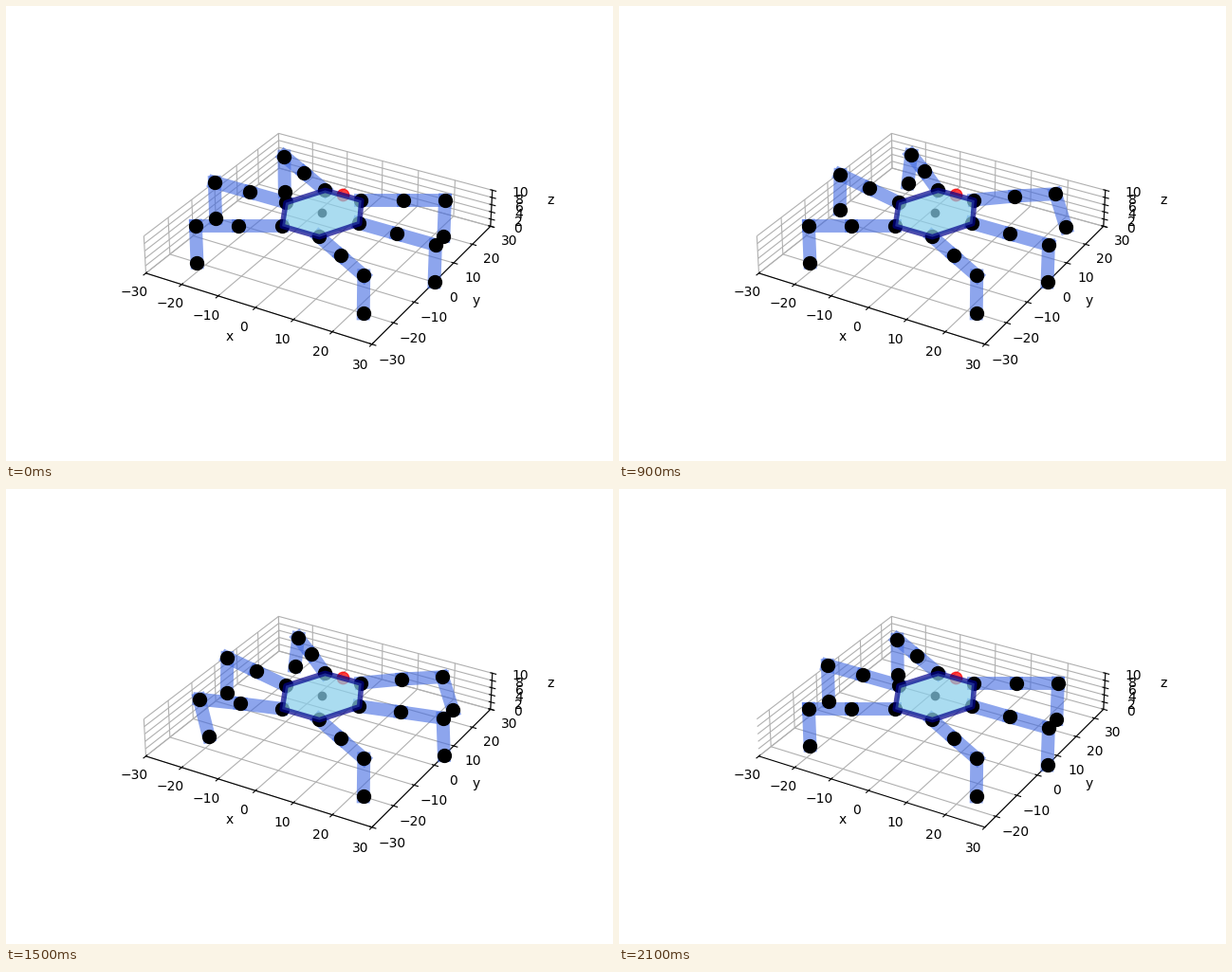
Recreate the animation shown at these times as a matplotlib script. Size 640 px wide and 480 px high, loop 2.25 s.

```python
import numpy as np
import matplotlib.pyplot as plt
from matplotlib.animation import FuncAnimation
from mpl_toolkits.mplot3d.art3d import Poly3DCollection

LINK = 10      # length of coxa, femur and tibia
HEIGHT = 10    # body height above ground
STRIDE = 5     # forward travel per gait cycle
LIFT = 5       # foot clearance while swinging
STEPS = 15

# Hip position (x, y) and resting yaw, in stepping order
LEGS = [(-5, 10, 150), (5, 10, 30), (-10, 0, 180),
        (10, 0, 0), (-5, -10, 210), (5, -10, -30)]
OUTLINE = [(-10, 0), (-5, 10), (5, 10), (10, 0), (5, -10), (-5, -10)]


def solve_leg(hip, foot):
    """Joint positions hip, coxa end, knee, foot by inverse kinematics."""
    dx, dy, dz = foot - hip
    yaw = np.arctan2(dy, dx)
    reach = np.hypot(dx, dy) - LINK
    pitch = np.arctan2(dz, reach) + np.arccos(np.hypot(reach, dz) / (2 * LINK))
    out = np.array([np.cos(yaw), np.sin(yaw), 0])
    coxa = hip + LINK * out
    knee = coxa + LINK * (np.cos(pitch) * out + np.array([0, 0, np.sin(pitch)]))
    return np.array([hip, coxa, knee, foot])


def leg_pose(i, step):
    """Leg i swings up on step 2i+1 and lands on step 2i+2."""
    x, y, yaw = LEGS[i]
    a = np.radians(yaw)
    hip = np.array([x, y, HEIGHT], float)
    foot = np.array([x + 2 * LINK * np.cos(a), y + 2 * LINK * np.sin(a), 0])
    if step > 2 * i:
        foot[1] += STRIDE
    if step == 2 * i + 1:
        foot[2] = LIFT
    if step == STEPS - 1:
        hip[1] += STRIDE
    return solve_leg(hip, foot)


fig = plt.figure(figsize=(6.4, 4.8), dpi=100)
ax = fig.add_subplot(projection='3d')
ax.set_box_aspect((6, 6, 1))
ax.set(xlim=(-30, 30), zlim=(0, 10), xlabel='x', ylabel='y', zlabel='z')
for axis in (ax.xaxis, ax.yaxis, ax.zaxis):
    axis.set_pane_color((1, 1, 1, 0))

bones = [[ax.plot([], [], [], color='royalblue', lw=10, alpha=0.6)[0]
          for _ in range(3)] for _ in LEGS]
joints = [ax.plot([], [], [], 'ko', ms=10)[0] for _ in LEGS]
center, = ax.plot([], [], [], 'ko', ms=6)
head, = ax.plot([], [], [], 'ro', ms=9, alpha=0.75)
body = Poly3DCollection([[(x, y, HEIGHT) for x, y in OUTLINE]], alpha=0.7,
                        facecolor='skyblue', edgecolor='darkblue', lw=4)
ax.add_collection3d(body)


def update(step):
    shift = STRIDE if step == STEPS - 1 else 0
    ax.set_ylim(-30 + shift, 30 + shift)
    for i in range(len(LEGS)):
        pts = leg_pose(i, step)
        joints[i].set_data_3d(*pts.T)
        for k, bone in enumerate(bones[i]):
            bone.set_data_3d(*pts[k:k + 2].T)
    body.set_verts([[(x, y + shift, HEIGHT) for x, y in OUTLINE]])
    center.set_data_3d([0], [shift], [HEIGHT])
    head.set_data_3d([0], [10 + shift], [HEIGHT])


anim = FuncAnimation(fig, update, frames=STEPS, interval=150, init_func=lambda: None)
plt.show()
```
